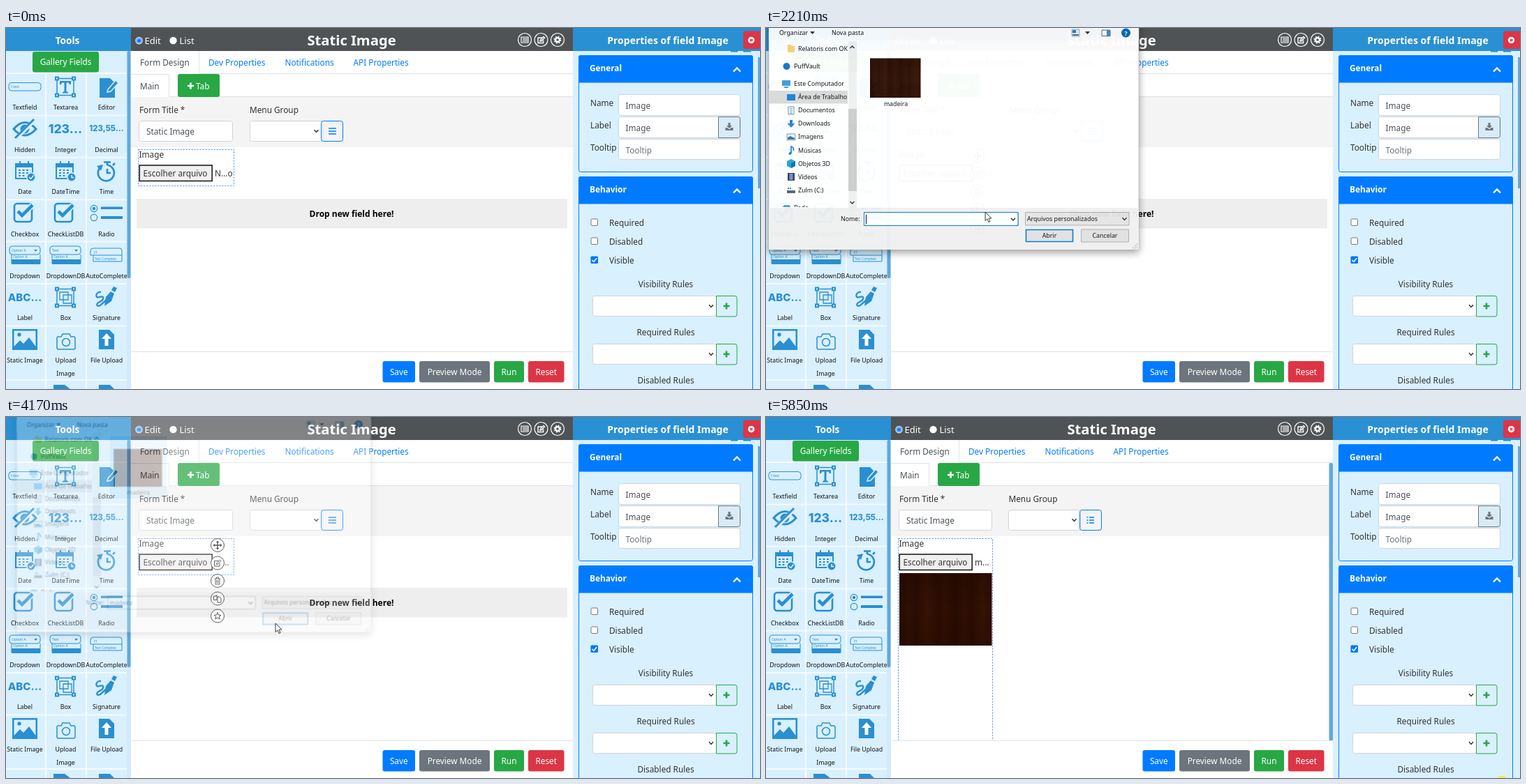
Animation of 1080x518 px, one loop 5.92 s. Source, as an HTML page:

```html
<!DOCTYPE html>
<html lang="en">
<head>
<meta charset="utf-8">
<title>Form builder</title>
<style>
html, body { margin: 0; width: 100%; height: 100%; overflow: hidden; background: #fff; }
svg { display: block; width: 100vw; height: 100vh; }
text { font: 11.8px "Noto Sans", sans-serif; fill: #333; white-space: pre; }
.mid { text-anchor: middle; }
.semi { font-weight: 600; }
.white { fill: #fff; }
.link { fill: #007bff; }
.value { fill: #495057; }
#labels text, #dialog text { font-size: 8.8px; fill: #111; }
.big { font: 800 15px Inter, sans-serif; fill: #2a8fd0; }
.tiny { font-size: 5px; fill: #2a8fd0; }
.input { fill: #fff; stroke: #ced4da; }
.card { fill: #d9f0ff; stroke: #007bff; }
.line { fill: none; stroke: #2a8fd0; stroke-width: 2; }
.ink { fill: none; stroke: #222; }
.chev { fill: none; stroke: #333; stroke-width: 1.5; }
.menu { fill: none; stroke: #007bff; }

.bar, .before, .after, .nofile, .file, .press, .hover, .selected, .caret, .focus, .content, .spot {
  animation: 5920ms step-end infinite;
}
.bar { animation-name: bar; }
.before { animation-name: before; }
.after { animation-name: after; }
.nofile { animation-name: nofile; }
.file { animation-name: file; }
.press { animation-name: press; }
.hover { animation-name: hover; }
.selected { animation-name: selected; }
.focus { animation-name: focus; }
.caret { animation-name: caret; }
.content { animation-name: content; }
.spot { animation-name: spot; }
@keyframes bar { 0% { opacity: 0 } 15.1% { opacity: 1 } 75.2%, 100% { opacity: 0 } }
@keyframes before { 0% { opacity: 1 } 75.2%, 100% { opacity: 0 } }
@keyframes after { 0% { opacity: 0 } 75.2%, 100% { opacity: 1 } }
@keyframes nofile { 0% { opacity: 1 } 70.4%, 100% { opacity: 0 } }
@keyframes file { 0% { opacity: 0 } 70.4%, 100% { opacity: 1 } }
@keyframes press { 0% { opacity: 0 } 23.3% { opacity: 1 } 25.6%, 100% { opacity: 0 } }
@keyframes hover { 0% { opacity: 0 } 44.2% { opacity: 1 } 51%, 100% { opacity: 0 } }
@keyframes selected { 0% { opacity: 0 } 51%, 100% { opacity: 1 } }
@keyframes focus { 0% { opacity: 1 } 51%, 100% { opacity: 0 } }
@keyframes caret { 0% { opacity: 1 } 44.2%, 100% { opacity: 0 } }
@keyframes content { 0% { opacity: 0 } 34.9%, 100% { opacity: 1 } }
@keyframes spot { 0% { opacity: 0 } 98.8%, 100% { opacity: 1 } }

#dialog { transform-origin: 269px 99px; animation: dialog 5920ms linear infinite; }
@keyframes dialog {
  0%, 33.77% { opacity: 0; transform: scale(.968); }
  33.78% { opacity: .33; transform: scale(.968); }
  34.97% { opacity: .6; transform: scale(.985); }
  37.33% { opacity: .965; transform: none; }
  38.5%, 67.6% { opacity: 1; transform: none; }
  71.6%, 100% { opacity: 0; transform: scale(.94); }
}
#frame { filter: drop-shadow(0 4px 6px rgba(0, 0, 0, .4)); }

#pointer { animation: pointer 5920ms linear infinite; }
@keyframes pointer {
  0%, 4.38% { opacity: 0; transform: translate(939px, 502px); }
  4.39% { opacity: 1; transform: translate(939px, 502px); animation-timing-function: cubic-bezier(.333, .523, .667, .857); }
  13.85% { transform: translate(298px, 230px); animation-timing-function: ease-out; }
  20.78%, 24.5% { transform: translate(251px, 206px); animation-timing-function: ease-in-out; }
  32.6% { transform: translate(308px, 264px); }
  33.78% { transform: translate(310px, 265px); }
  37.33% { transform: translate(314px, 264px); animation-timing-function: ease-in; }
  43.07% { transform: translate(221px, 118px); animation-timing-function: ease-out; }
  47.64%, 53.4% { transform: translate(196px, 85px); animation-timing-function: ease-in-out; }
  60% { transform: translate(371px, 294px); animation-timing-function: ease-out; }
  63.5%, 71% { transform: translate(386px, 296px); }
  72.6% { transform: translate(395px, 302px); animation-timing-function: cubic-bezier(.4, .1, .7, .7); }
  80.74% { transform: translate(682px, 437px); animation-timing-function: cubic-bezier(.3, .4, .6, 1); }
  90%, 100% { opacity: 1; transform: translate(1054px, 526px); }
}
</style>
</head>
<body>
<svg viewBox="0 0 1080 518">
<defs>
  <linearGradient id="wood" x2=".3" spreadMethod="reflect">
    <stop stop-color="#270a01"/><stop offset=".35" stop-color="#311003"/>
    <stop offset=".6" stop-color="#2a0c02"/><stop offset="1" stop-color="#361305"/>
  </linearGradient>
  <linearGradient id="shade" x2="0" y2="1">
    <stop stop-color="#1a0600" stop-opacity=".35"/><stop offset=".5" stop-color="#1a0600" stop-opacity="0"/>
    <stop offset="1" stop-color="#1a0600" stop-opacity=".25"/>
  </linearGradient>
  <clipPath id="side"><path d="M4 19H117V257H4z"/></clipPath>
  <clipPath id="work"><path d="M179 33H812V464H179z"/></clipPath>
  <g id="edit" fill="none"><path d="M2-3.5H-4V4H3.5V0"/><path d="M-1 1.5L-.5-.5 4-5 5.5-3.5 1 1z"/></g>
  <path id="plus" d="M-4.5 0H4.5M0-4.5V4.5" stroke-width="2.6"/>
  <path id="down" class="chev" d="M-3-1.7L0 1.5 3-1.7"/>
  <g id="calendar">
    <path class="line" d="M-13-9H11V12H-13zM-7-13V-7M5-13V-7"/><path d="M-13-9H11V-4H-13z"/>
    <path class="line" stroke-dasharray="3 2.5" d="M-9 0H8M-9 4H8M-9 8H0"/>
    <circle cx="9" cy="10" r="6.2" stroke="#d9f0ff" stroke-width="1.5"/>
  </g>
  <g id="check"><rect class="line" x="-13" y="-13" width="25" height="26" rx="4" style="stroke-width:2.6"/>
    <path d="M-8-2L-2 4 13-11" fill="none" stroke="#d9f0ff" stroke-width="8"/>
    <path class="line" d="M-8-2L-2 4 13-11" style="stroke-width:4.6"/></g>
  <g id="combo"><rect class="line" x="-22" y="-12" width="44" height="12" rx="4" style="stroke-width:1"/>
    <path class="line" d="M-19 0V13H22V0" style="stroke-width:1"/><path d="M-19 7H22V14H-19zM13-7H18L15.500-4z"/></g>
  <g id="handles"><path class="line" d="M-12-12H12V12H-12z" style="stroke-width:1.5"/>
    <path d="M-15-15h6v6h-6zM9-15h6v6H9zM-15 9h6v6h-6zM9 9h6v6H9z"/>
    <path d="M-13-13h2v2h-2zM11-13h2v2h-2zM-13 11h2v2h-2zM11 11h2v2h-2z" fill="#d9f0ff"/></g>
  <path id="doc" d="M-11-14H4L11-7V14H-11z"/>
  <g id="rules"><rect class="input" x=".5" y=".5" width="177" height="29" rx="3"/><use href="#down" x="170" y="15"/>
    <path d="M177.500.5H204a3 3 0 0 1 3 3V27a3 3 0 0 1-3 3H177.500z" fill="#d9f0ff" stroke="#28a745"/>
    <use href="#plus" x="192" y="15" stroke="#28a745"/></g>
</defs>

<!-- Tools -->
<path d="M0 0H179V518H0z" fill="#d9f0ff"/>
<path d="M0 0H179V33H0z" fill="#2990d3"/>
<text class="mid semi white" x="88" y="23" style="font-size:13.6px">Tools</text>
<path id="grid" stroke="#f5fbff" stroke-width="2"/>
<rect x="38" y="34" width="95" height="29.500" rx="3" fill="#28a745"/>
<text class="mid white" x="85.500" y="53">Gallery Fields</text>
<g fill="#2a8fd0">
  <rect class="line" x="4" y="78.500" width="46" height="11.500" rx="4" style="stroke-width:1"/><text class="tiny" x="7" y="86">I text</text>
  <use href="#handles" x="85" y="84.500"/><path d="M77 76H93V81H91L90 78.500H86.500V91L89 92V93.500H81V92L83.500 91V78.500H80L79 81H77z"/>
  <use href="#doc" x="145" y="86"/><path d="M146 88L157 75 161 79 150 91 145 92z" stroke="#d9f0ff" stroke-width="1.5"/>
  <path class="line" d="M11 145Q27 126 43 145Q27 163 11 145z" style="stroke-width:3"/><circle cx="27" cy="145" r="6.500"/>
  <path d="M14 159L41 132" stroke="#d9f0ff" stroke-width="6"/><path class="line" d="M13 158L40 131" style="stroke-width:3"/>
  <text class="big mid" x="85" y="151" style="font-size:17.500px">123...</text>
  <text class="big mid" x="144" y="148" style="font-size:11.300px">123,55...</text>
  <use href="#calendar" x="27" y="204"/><path d="M33 214l2.500 2.500 4-5" fill="none" stroke="#fff" stroke-width="1.300"/>
  <use href="#calendar" x="85" y="204"/><path d="M94 211v3.500h3" fill="none" stroke="#fff" stroke-width="1.300"/>
  <path class="line" d="M135 200A11.500 11.500 0 1 0 145 196.500M140 192.500H150M145 193V197M145 202V208H150M153 197L156 194" style="stroke-width:2.700"/><path d="M130 198L139 196 136 205z"/>
  <use href="#check" x="25" y="265"/><use href="#check" x="83" y="265"/>
  <circle class="line" cx="126" cy="259" r="4.700" style="stroke-width:1.200"/><circle cx="126" cy="259" r="2.300"/>
  <circle class="line" cx="126" cy="272" r="4.700" style="stroke-width:1.200"/><path d="M136 256.500H167V260H136zM136 270H167V274H136z"/>
  <use href="#combo" x="27" y="325"/><use href="#combo" x="85" y="325"/>
  <text class="tiny" x="8" y="321">Option A</text><text class="tiny" x="66" y="321">Text</text>
  <text class="tiny" x="10" y="330">Option A</text><text class="tiny" x="68" y="330">Option A</text>
  <text class="tiny white" x="10" y="337">Click B</text><text class="tiny white" x="68" y="337">Option B</text>
  <path class="line" d="M125 316H163Q166 316 166 320V326H121V320Q121 316 125 316zM125 326V335H166V326" style="stroke-width:1"/>
  <text class="tiny" x="126" y="324">IT</text><text class="tiny" x="127" y="333" style="font-size:4.600px">Text Complete</text>
  <text class="big mid" x="27" y="392">ABC...</text>
  <use href="#handles" x="85" y="386.500"/><path class="line" d="M77 379H89V390H77zM82 383H94V395H82z" style="stroke-width:1.300"/>
  <path class="line" d="M136 379C128 378 127 389 134 386C142 383 140 391 134 393C128 396 130 401 135 398L144 390" style="stroke-width:2.400"/>
  <path d="M143 386L150 378 155 381 151 392 141 399zM151 376L154 371 159 373 156 379z"/>
  <path d="M9 432H45V462H9z"/><path d="M11.500 434.500H42.500V457L33 444 25 453 20 448 11.500 457z" fill="#d9f0ff"/><circle cx="19" cy="440" r="2.700"/>
  <path class="line" d="M75 443H79L81 439H91L93 443H97Q99 443 99 445V459Q99 461 97 461H75Q73 461 73 459V445Q73 443 75 443z" style="stroke-width:1.500"/><circle class="line" cx="86" cy="451" r="5.500" style="stroke-width:1.500"/>
  <use href="#doc" x="144" y="447"/><path d="M144 438L151 446H146.500V456H141.500V446H137z" fill="#fff"/>
  <path d="M68 512H84L92 518H68zM133 512H149L155 518H133z"/>
</g>
<g id="labels" class="mid"></g>
<path d="M173 33H179V518H173z" fill="#d3eafa"/><rect x="173.500" y="33" width="5" height="326" rx="2" fill="#62a9dc"/>

<!-- Form editor -->
<path d="M179 0H812V33H179z" fill="#505355"/>
<circle cx="190.500" cy="18" r="5.200" fill="#fff"/><circle cx="190.500" cy="18" r="3.800" fill="none" stroke="#0075ff" stroke-width="1"/><circle cx="190.500" cy="18" r="2.600" fill="#0075ff"/>
<circle cx="239.500" cy="18" r="5.200" fill="#fff"/>
<text class="white" x="198.500" y="22.500" style="font-size:13px">Edit</text><text class="white" x="248.500" y="22.500" style="font-size:13px">List</text>
<text class="mid semi white" x="495" y="25" style="font-size:20.200px">Static Image</text>
<g fill="none" stroke="#fff" stroke-width="1.200"><circle cx="743" cy="17" r="9.500"/><circle cx="766.500" cy="17" r="9.500"/><circle cx="790" cy="17" r="9.500"/>
  <path d="M738 13H748V21H738zM740 15H747M740 17H747M740 19H747"/><use href="#edit" x="766" y="17.500" stroke-width="1.400"/>
  <circle cx="790" cy="17" r="3" stroke-width="2.400"/><circle cx="790" cy="17" r="4.700" stroke-width="1.500" stroke-dasharray="1.850"/></g>
<path d="M276.500 33V65.500H812M233.500 98.500V66.500H179M233.500 98.500H812" fill="none" stroke="#dee2e6"/>
<text class="value" x="192" y="54">Form Design</text><text class="link" x="290" y="54">Dev Properties</text>
<text class="link" x="399.500" y="54">Notifications</text><text class="link" x="497.500" y="54">API Properties</text>
<text class="value" x="192" y="87.500">Main</text>
<rect x="246" y="66" width="60" height="33" rx="3" fill="#28a745"/><use href="#plus" x="264.500" y="83" stroke="#fff"/><text class="white" x="272" y="87.500">Tab</text>

<g clip-path="url(#work)">
  <path d="M179 99H812V171H179z" fill="#f4f4f4"/>
  <text x="191" y="121.500">Form Title *</text>
  <g class="before">
    <rect class="input" x="190.500" y="133.500" width="134" height="29" rx="3"/><text x="349" y="121.500">Menu Group</text>
    <rect class="input" x="349.500" y="133.500" width="104" height="29" rx="3"/><use href="#down" x="444.500" y="148"/>
    <rect class="menu" x="451.500" y="133.500" width="31" height="29" rx="3"/>
    <path d="M462 144H473M462 148H473M462 152H473" stroke="#007bff" stroke-width="1.600"/>
    <rect x="189.500" y="174.500" width="137" height="52" fill="none" stroke="#5b9bea" stroke-dasharray="2.400 1.600"/>
    <path d="M187 245H804V287.500H187z" fill="#eee"/><text class="mid" x="495" y="271" style="font-weight:700;font-size:12px;fill:#000">Drop new field here!</text>
  </g>
  <g class="after">
    <rect class="input" x="190.500" y="133.500" width="133" height="29" rx="3"/><text x="347.500" y="121.500">Menu Group</text>
    <rect class="input" x="347.500" y="133.500" width="103" height="29" rx="3"/><use href="#down" x="441.500" y="148"/>
    <rect class="menu" x="449.500" y="133.500" width="31" height="29" rx="3"/>
    <path d="M463 144H470M463 148H470M463 152H470M459.500 144H461.500M459.500 148H461.500M459.500 152H461.500" stroke="#007bff" stroke-width="1.600"/>
    <rect x="189.500" y="174.500" width="135" height="320" fill="none" stroke="#5b9bea" stroke-dasharray="2.400 1.600"/>
    <path d="M191 224H323.500V328H191z" fill="url(#wood)"/><path d="M191 224H323.500V328H191z" fill="url(#shade)"/>
    <path d="M806 66H812V465H806z" fill="#fff"/><rect x="806.500" y="66" width="5.500" height="399" rx="2" fill="#62a9dc"/>
  </g>
  <text class="value" x="201" y="153">Static Image</text>
  <text x="190.500" y="185.500">Image</text>
  <rect x="191.200" y="197" width="104" height="22.500" fill="#efefef" stroke="#111" stroke-width="1.500"/>
  <path class="press" d="M192 198H294.500V219H192z" fill="#f6f6f6"/>
  <text x="196.500" y="213">Escolher arquivo</text>
  <text class="nofile" x="299" y="213">N...o</text><text class="file" x="299" y="213">m...</text>
  <g class="bar ink">
    <g fill="#fff"><circle cx="303" cy="184" r="9.500"/><circle cx="303" cy="209.500" r="9.500"/><circle cx="303" cy="235" r="9.500"/><circle cx="303" cy="260.500" r="9.500"/><circle cx="303" cy="285.500" r="9.500"/></g>
    <path d="M297.500 184H308.500M303 178.500V189.500M301.500 180L303 178.500 304.500 180M301.500 188L303 189.500 304.500 188M299 182.500L297.500 184 299 185.500M307 182.500L308.500 184 307 185.500" stroke-width="1.400"/>
    <use href="#edit" x="302.500" y="210"/>
    <path d="M299 232H307M301.500 232V230H304.500V232M300 232V240H306V232M302 234V238.500M304 234V238.500" stroke-width=".9"/>
    <path d="M297.500 257H300L302 255.500V262.500H297.500zM303 258H305.500L308 260V266H303z" fill="#fff"/>
    <path d="M303 280.500L304.500 284 308 284.300 305.300 286.500 306.200 290 303 288 299.800 290 300.700 286.500 298 284.300 301.500 284z"/>
  </g>
</g>
<path d="M179 464.500H812" stroke="#dee2e6"/>
<g id="actions" class="mid"></g>

<!-- Properties -->
<path d="M812 0H1080V518H812z" fill="#d9f0ff"/><path d="M812 0H1080V33H812z" fill="#2990d3"/>
<path d="M1038 33H1048V34.500H1038zM1056 33H1067V34.500H1056z" fill="#2990d3"/>
<text class="mid semi white" x="948" y="23" style="font-size:14px">Properties of field <tspan font-weight="800">Image</tspan></text>
<rect x="1056" y="4.500" width="26" height="25.500" rx="3" fill="#dc3545"/><circle cx="1067.500" cy="17.500" r="4.700" fill="#fff"/><path d="M1065.700 15.700l3.600 3.600m0-3.600l-3.600 3.600" stroke="#dc3545" stroke-width="1.300"/>
<rect x="1077" y="42" width="4" height="188" fill="#62a9dc"/>
<rect class="card" x="820.500" y="39.500" width="249" height="167" rx="3"/><path d="M820 78.500V42a3 3 0 0 1 3-3H1067a3 3 0 0 1 3 3V78.500z" fill="#007bff"/>
<rect class="card" x="820.500" y="213.500" width="249" height="320" rx="3"/><path d="M820 252.500V216a3 3 0 0 1 3-3H1067a3 3 0 0 1 3 3V252.500z" fill="#007bff"/>
<path d="M1042 62.500L1047 57.500 1052 62.500M1042 236.500L1047 231.500 1052 236.500" fill="none" stroke="#fff" stroke-width="2.300"/>
<text class="semi white" x="836" y="62">General</text><text class="semi white" x="836" y="236">Behavior</text>
<text x="837" y="112">Name</text><text x="837" y="144">Label</text><text x="837" y="175.500">Tooltip</text>
<rect class="input" x="877.500" y="95.500" width="174" height="30" rx="3"/><rect class="input" x="877.500" y="127.500" width="146" height="30" rx="3"/><rect class="input" x="877.500" y="159.500" width="174" height="29" rx="3"/>
<text class="value" x="887.500" y="116">Image</text><text class="value" x="887.500" y="148">Image</text><text x="887.500" y="179.500" style="fill:#6c757d">Tooltip</text>
<path d="M1020.500 127.500H1048.500a3 3 0 0 1 3 3V154.500a3 3 0 0 1-3 3H1020.500z" fill="#d9ebf7" stroke="#6c757d"/>
<path d="M1034.500 136H1037.500V140H1040L1036 144 1032 140H1034.500zM1030.500 143H1033L1036 145.500 1039 143H1041.500V147H1030.500z" fill="#6c757d"/>
<g fill="#fff" stroke="#767676"><rect x="838" y="274" width="9.500" height="9.500" rx="1.500"/><rect x="838" y="301" width="9.500" height="9.500" rx="1.500"/></g>
<rect x="837.500" y="327.500" width="10.500" height="10.500" rx="1.500" fill="#0075ff"/><path d="M839.500 333l2.300 2.300 4.400-5" fill="none" stroke="#fff" stroke-width="1.600"/>
<text x="864" y="284">Required</text><text x="864" y="311">Disabled</text><text x="864" y="338">Visible</text>
<text class="mid" x="945" y="372">Visibility Rules</text><text class="mid" x="945" y="441">Required Rules</text><text class="mid" x="945" y="510">Disabled Rules</text>
<use href="#rules" x="840" y="384"/><use href="#rules" x="840" y="453"/>
<circle class="spot" cx="1054.500" cy="526" r="11" fill="#f3e94f"/>

<!-- File chooser -->
<g id="dialog">
  <path id="frame" d="M4-120H534V318H4z" fill="#fff" stroke="#aaa" stroke-width=".6"/>
  <path d="M4 258H534V318H4z" fill="#f0f0f0"/>
  <g class="content">
    <path d="M4 0H534V18H4z" fill="#fafbfc"/>
    <text x="19" y="10">Organizar</text><text x="94" y="10">Nova pasta</text>
    <path d="M63 5H70L66.500 9zM457 5H464L460.500 9z" fill="#333"/>
    <path d="M438 2H449V12H438z" fill="#e3edf5" stroke="#9ab"/><path d="M439 3H444V7H439zM439 9H448V11H439z" fill="#3879b5"/>
    <path d="M481 3H493V11.500H481z" fill="#fff" stroke="#567"/><path d="M488 3H493V11H488z" fill="#3c8ad0"/>
    <circle cx="515.500" cy="7" r="6.500" fill="#0867b2"/><text class="mid" x="515.500" y="10.500" style="font-weight:700;fill:#fff">?</text>
    <g clip-path="url(#side)">
      <path d="M4 90H117V108.500H4z" fill="#d9d9d9"/>
      <path d="M31 24H36L37 25.500H41V35H31z" fill="#f5d675"/>
      <circle cx="29.500" cy="55" r="5" fill="#1373c9"/>
      <path d="M23 75H35V83H23zM26 84H32V86H26z" fill="#429bd4"/><path d="M30 95H42V104H30z" fill="#1683d8"/>
      <path d="M32 113H40V124H32z" fill="#fff" stroke="#789"/><path d="M34 116H38M34 119H38M34 122H38" stroke="#3a83c4"/>
      <path d="M34 132H38V137H41.500L36 143 30.500 137H34z" fill="#2586d2"/>
      <path d="M30 152H42V161H30z" fill="#eef5fa" stroke="#89a"/><path d="M31 160V157L35 155 41 158V160z" fill="#3976a5"/>
      <path d="M36 180V170Q41 172 39 176" fill="none" stroke="#1a80d3" stroke-width="1.700"/><circle cx="34.500" cy="180" r="2" fill="#1a80d3"/>
      <path d="M30 191L36 188 42 191V198L36 201 30 198z" fill="#26a5d8"/><path d="M36 194L42 191V198L36 201z" fill="#1271a8"/>
      <path d="M31 208H41V219H31z" fill="#354050"/><path d="M33.500 209H38.500V218H33.500z" fill="#7d91c4"/>
      <path d="M30 233H42V237H30z" fill="#58646c"/><path d="M31 229h2v2h-2zM34 229h2v2h-2z" fill="#2383d0"/>
      <path d="M23 258L26 254H33L36 258z" fill="#4b9ed0"/>
      <g id="places"></g>
    </g>
    <path d="M118 19H130V258H118z" fill="#f0f0f0"/><path d="M118 116H130V234H118z" fill="#cdcdcd"/>
    <path class="chev" d="M120.500 29L123.500 26 126.500 29M120.500 249L123.500 252 126.500 249"/>
    <path class="hover" d="M144.500 25.500H227.500V116.500H144.500z" fill="#e5f3ff"/>
    <path class="selected" d="M144.500 25.500H227.500V116.500H144.500z" fill="#cce8ff" stroke="#99d1ff"/>
    <path d="M149 43.500H221.500V100H149z" fill="url(#wood)"/><path d="M149 43.500H221.500V100H149z" fill="url(#shade)"/>
    <text class="mid" x="186" y="112">madeira</text>
    <text x="107" y="277">Nome:</text>
    <path d="M140.500 264.500H361V283.500H140.500z" fill="#fff" stroke="#777"/>
    <path class="focus" d="M140.500 264.500H361V283.500H140.500z" fill="#fff" stroke="#0078d7"/>
    <path class="caret" d="M143.500 268V281" stroke="#000"/><text class="selected" x="143" y="277.500">madeira</text>
    <path d="M371.500 264.500H520V283H371.500z" fill="#e5e5e5" stroke="#adadad"/><text x="374" y="277">Arquivos personalizados</text>
    <use href="#down" x="354" y="274.500"/><use href="#down" x="513.500" y="274"/>
    <path d="M372.500 289.500H439.500V306.500H372.500z" fill="#e1e1e1" stroke="#0078d7" stroke-width="1.600"/><text class="mid" x="406" y="301">Abrir</text>
    <path d="M451.500 289H519.500V307H451.500z" fill="#e1e1e1" stroke="#adadad"/><text class="mid" x="485.500" y="301">Cancelar</text>
    <path d="M525 315.500H532M528 312.500H532M531 309.500H532" stroke="#aaa" stroke-width="1.500" stroke-dasharray="1.500"/>
  </g>
</g>

<path id="pointer" d="M0 0V12.500L2.900 9.900 5 14.500 7 13.600 5 9.100H8.900z" fill="#fff" stroke="#222" stroke-width=".9"/>
</svg>
<script>
const byId = id => document.getElementById(id);
const label = (x, y, s, cls = "") => `<text class="${cls}" x="${x}" y="${y}">${s}</text>`;

const tools = ["Textfield", "Textarea", "Editor", "Hidden", "Integer", "Decimal", "Date", "DateTime", "Time",
  "Checkbox", "CheckListDB", "Radio", "Dropdown", "DropdownDB", "AutoComplete", "Label", "Box", "Signature",
  "Static Image", "Upload", "File Upload"];
byId("labels").innerHTML = tools.map((name, i) =>
  label(27 + 58.5 * (i % 3), 117.3 + 60.4 * Math.floor(i / 3), name)).join("") + label(85.5, 499, "Image");

const rows = Array.from({ length: 7 }, (_, i) => `M0 ${65 + 60.4 * i}H173`).join("");
byId("grid").setAttribute("d", rows + "M0 505H173M57 65V518M115 65V518");

const actions = [["Save", 539.5, 46.5, "#007bff"], ["Preview Mode", 592, 101, "#6c757d"],
  ["Run", 699, 43, "#28a745"], ["Reset", 748, 51.5, "#dc3545"]];
byId("actions").innerHTML = actions.map(([name, x, w, color]) =>
  `<rect x="${x}" y="478" width="${w}" height="30.5" rx="3" fill="${color}"/>` +
  label(x + w / 2, 498, name, "white")).join("");

const places = ["Área de Trabalho", "Documentos", "Downloads", "Imagens", "Músicas", "Objetos 3D", "Vídeos", "Zulm (C:)"];
byId("places").innerHTML = label(46, 32.5, "Relatoris com OK") + label(40, 58, "PuffVault") +
  label(40, 83, "Este Computador") + places.map((name, i) => label(46, 102.3 + 19.05 * i, name)).join("") +
  label(40, 261, "Rede");
</script>
</body>
</html>
```
